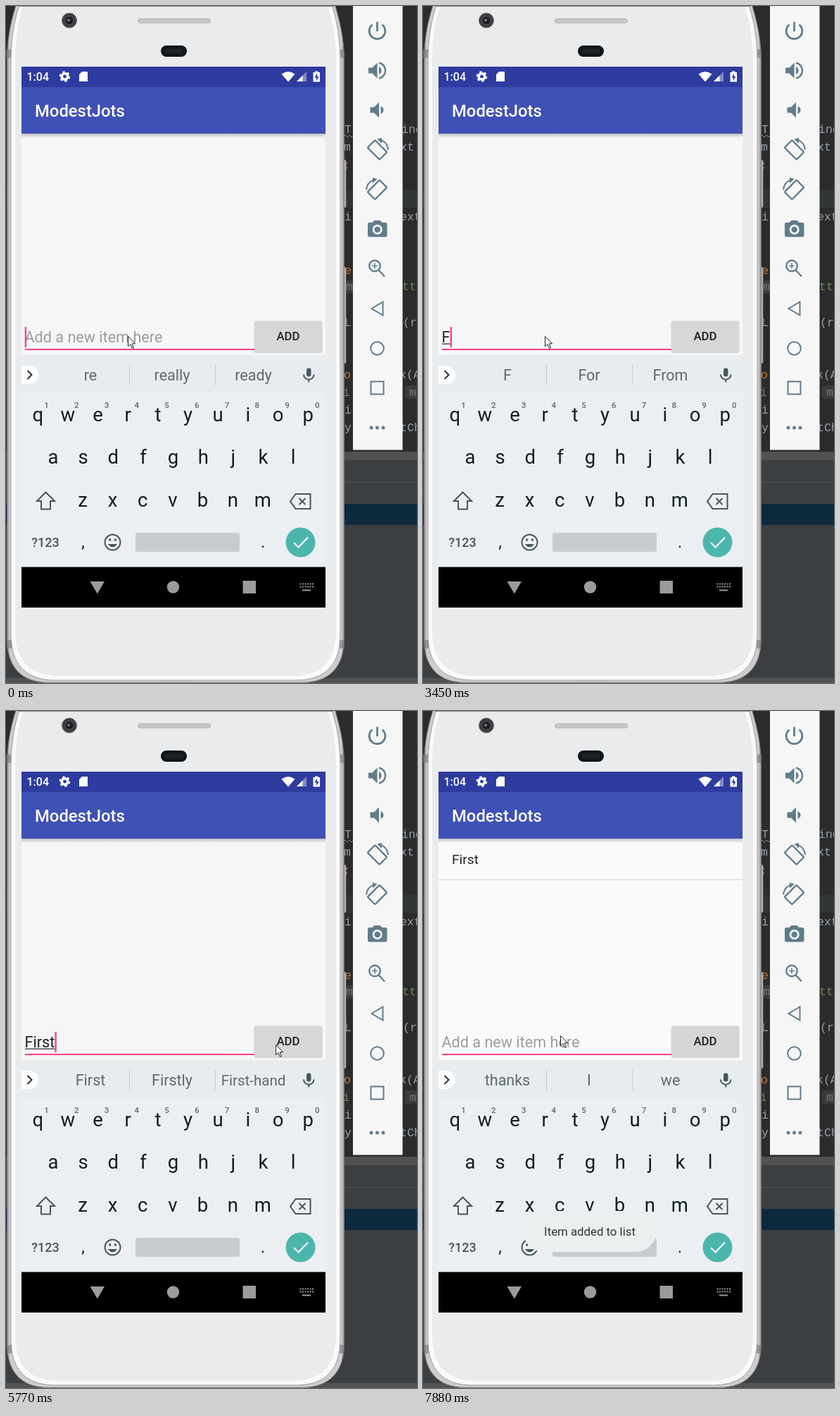
These frames come from a looping animation (584x960 px, 8 s). An HTML page:

```html
<!DOCTYPE html>
<html lang="en">
<head>
<meta charset="utf-8">
<title>Todo demo</title>
<style>
  html, body { margin: 0; width: 100%; height: 100%; overflow: hidden; background: #2b2b2b; }
  svg { display: block; width: 100%; height: 100%; }
  text { font-family: Roboto, sans-serif; white-space: pre; }
  .mid { text-anchor: middle; }
  .code text { font: 16.500px "Liberation Mono", monospace; fill: #94a0ad; }
  .key { font-size: 27.5px; fill: #101e25; }
  .digit { font-size: 11.5px; font-weight: 500; fill: #5a686f; }
  .sug { font-size: 21.5px; fill: #5c696f; }
  .line { fill: none; stroke-width: 2; }
  .tool { fill: #607d8b; stroke: #607d8b; }
  .tool .line { stroke-width: 2.4; fill: none; }
</style>
</head>
<body>
<svg viewBox="0 0 584 960">
  <defs>
    <linearGradient id="metal">
      <stop offset="0" stop-color="#8f8c8e"/><stop offset=".008" stop-color="#cfccce"/>
      <stop offset=".5" stop-color="#cac8ca"/><stop offset=".992" stop-color="#cfccce"/>
      <stop offset="1" stop-color="#8f8c8e"/>
    </linearGradient>
    <linearGradient id="drop" x2="0" y2="1">
      <stop offset="0" stop-color="#000" stop-opacity=".22"/><stop offset="1" stop-color="#000" stop-opacity="0"/>
    </linearGradient>
    <clipPath id="screen"><rect x="22" y="86" width="432" height="767"/></clipPath>
  </defs>

  <!-- editor behind -->
  <rect width="584" height="960" fill="#2b2b2b"/>
  <rect y="261" width="584" height="25" fill="#323535"/>
  <rect y="632" width="584" height="328" fill="#3c3f41"/>
  <rect y="632" width="584" height="12" fill="#515151"/>
  <rect y="675" width="584" height="1" fill="#525557"/>
  <rect y="706" width="584" height="30" fill="#0d293e"/>
  <rect y="953" width="584" height="7" fill="#515456"/>
  <rect x="470" y="389" width="26" height="19" rx="3" fill="#3b3b3b"/>
  <rect x="567" y="538" width="30" height="19" rx="3" fill="#3b3b3b"/>
  <g class="code" id="code"></g>
  <path d="M480 185l2-2 3 3 3-3 3 3 2-2" fill="none" stroke="#8c8c8c"/>

  <!-- phone body -->
  <rect x="478" y="218" width="5" height="68" rx="2" fill="#c9c7c9" stroke="#777"/>
  <rect x="478" y="370" width="5" height="137" rx="2" fill="#c9c7c9" stroke="#777"/>
  <path d="M17-10C7 20 1.500 45 1.500 78V897C1.500 937 21 959 60 959.500H421C460 959 480.500 937 480.500 897V78C480.500 45 474 20 465-10Z" fill="url(#metal)" stroke="#777477"/>
  <path d="M22-10C11 20 7 48 7 80V890C7 933 27 955 68 956H414C455 955 475 933 475 890V80C475 48 471 20 460-10Z" fill="#fafafa" stroke="#a09da0"/>
  <path d="M28-10C16 22 13 48 13 82V884C13 927 32 949 73 950H409C450 949 469 927 469 884V82C469 48 465 22 454-10Z" fill="#e9ebed"/>
  <path d="M0 67.500H7M475 67.500H481M1 905H8M474 905H480.500" stroke="#77757a" stroke-width="12" opacity=".6"/>
  <path d="M17 .5H465" stroke="#8b8b8e"/>
  <circle cx="90" cy="20.500" r="10.500" fill="#3d3d40" stroke="#6d6d70"/>
  <circle cx="90" cy="20.500" r="6" fill="#1d1d21" stroke="#59595d"/>
  <circle cx="89" cy="20" r="2" fill="#777a82"/>
  <rect x="187.500" y="18" width="103" height="6" rx="3" fill="#c6c7c9" stroke="#b0b1b3"/>
  <rect x="220" y="56" width="37" height="16" rx="8" fill="#11161a"/>
  <path d="M229 64H248" stroke="#1b2329" stroke-width="7" stroke-linecap="round"/>

  <g clip-path="url(#screen)">
    <!-- app -->
    <rect id="page" x="22" y="181" width="432" height="314"/>
    <rect x="22" y="181" width="432" height="6" fill="url(#drop)"/>
    <rect x="22" y="86" width="432" height="29" fill="#2d3c9e"/>
    <rect x="22" y="115" width="432" height="66" fill="#3f51b5"/>
    <text x="29.500" y="106" font-size="16" font-weight="500" fill="#fff">1:04</text>
    <g fill="#fff">
      <circle cx="83.500" cy="100" r="4.300" fill="none" stroke="#fff" stroke-width="3.600"/>
      <circle cx="83.500" cy="100" r="6.600" fill="none" stroke="#fff" stroke-width="2.200" stroke-dasharray="3.450"/>
      <path d="M108 93H116V107H104V97Z"/>
      <path d="M391.500 96.500Q401 89.500 410.500 96.500L401 107.500Z"/>
      <path d="M427 93V107H413Z" opacity=".4"/><path d="M421.500 98.500V107H413Z"/>
      <path d="M439 92.500H443.500V94H446V107.500H436.500V94H439Z"/>
    </g>
    <path d="M442 95.500L438.500 101.500H441V106L444.500 100H442Z" fill="#2d3c9e"/>
    <text x="41" y="156.500" font-size="23.800" font-weight="500" fill="#fff">ModestJots</text>

    <g id="item">
      <text x="41" y="217" font-size="19.200" fill="#212121">First</text>
      <rect x="22" y="238.500" width="432" height="1.500" fill="#dedede"/>
    </g>

    <rect x="27" y="486" width="326" height="2" fill="#fb4480"/>
    <text id="hint" x="26.500" y="477" font-size="21.600" fill="#9c9c9c">Add a new item here</text>
    <text id="typed" x="26.500" y="477" font-size="21.600" fill="#212121"></text>
    <rect id="under" x="27" y="478.500" height="1.300" fill="#333"/>
    <rect id="caret" y="455" width="2.400" height="29" fill="#f2487f"/>
    <rect x="352.500" y="447" width="97" height="45" rx="3" fill="#000" opacity=".14"/>
    <rect id="btn" x="353" y="446.500" width="96" height="43.500" rx="2"/>
    <text class="mid" x="401" y="474" font-size="16.800" font-weight="500" fill="#212121">ADD</text>

    <!-- keyboard -->
    <rect x="22" y="495" width="432" height="301" fill="#eceff1"/>
    <rect x="22" y="495" width="432" height="54" fill="#e8ecef"/>
    <path d="M22 510H33A13 13 0 0 1 33 536H22Z" fill="#fff"/>
    <path d="M30.500 517L36.500 523L30.500 529" class="line" stroke="#263238" stroke-width="2.400"/>
    <path d="M175.500 509V538M297.500 509V538" stroke="#c5ccd0"/>
    <rect x="427" y="513.500" width="6.500" height="12" rx="3.200" fill="#46565e"/>
    <path d="M423 522.500A7.200 7.200 0 0 0 437.500 522.500M430.200 529.500V533.500" class="line" stroke="#46565e"/>
    <g id="sugs"></g>
    <g id="keys"></g>
    <text class="mid" x="56" y="767" font-size="18" font-weight="500" fill="#46565e">?123</text>
    <g class="line" stroke="#46565e">
      <path d="M56.500 689.500L69 702H63V713.500H50V702H44Z"/>
      <path d="M411.500 692H432.500V713H411.500L404 702.500ZM416.500 698L425.500 707M425.500 698L416.500 707"/>
      <circle cx="151.500" cy="760.500" r="11"/>
      <path d="M146 763.500Q151.500 770 157 763.500Z" stroke-width="1.200" fill="#46565e"/>
    </g>
    <circle cx="147.700" cy="757" r="1.700" fill="#46565e"/><circle cx="155.300" cy="757" r="1.700" fill="#46565e"/>
    <rect x="184" y="747" width="148" height="27" rx="3" fill="#c7ccd0"/>
    <circle cx="418.500" cy="760.500" r="21" fill="#4db6ac"/>
    <path d="M409 761L415.500 767.500L429 753.500" class="line" stroke="#fff" stroke-width="2.400"/>

    <rect x="22" y="795.500" width="432" height="58" fill="#000"/>
    <g fill="#9b9b9b">
      <path d="M119.500 816H140L129.800 833.500Z"/>
      <circle cx="237.500" cy="824" r="8.700"/>
      <rect x="336.500" y="815" width="18.500" height="18"/>
      <path d="M417.500 819.500H437M417.500 823.500H437" stroke="#9b9b9b" stroke-width="2" stroke-dasharray="2 1.500"/>
      <path d="M421 828.500H433" stroke="#9b9b9b" stroke-width="2"/>
    </g>

    <g id="toast">
      <rect x="142.500" y="709" width="189" height="58" rx="29" fill="#eceff0"/>
      <text class="mid" x="237" y="743.500" font-size="16.800" fill="#303436">Item added to list</text>
    </g>
  </g>

  <!-- side tools -->
  <rect x="493" width="70.500" height="629.500" fill="#f6f6f6"/>
  <g class="tool" stroke-width="0">
    <path class="line" d="M527.500 22.500V36M520.500 26.500A11.300 11.300 0 1 0 534.500 26.500" style="stroke-width:2.800"/>
    <path d="M515 87.500H520.500L527.500 80.500V102.500L520.500 95.500H515ZM530 86Q533.500 88 533.500 91.500T530 97Z"/>
    <path class="line" d="M530 80.500A11.200 11.200 0 0 1 530 102.500"/>
    <path d="M517.500 143.500H523L530 136.500V158.500L523 151.500H517.500ZM532.500 142Q536.500 144 536.500 147.500T532.500 153Z"/>
    <g id="rot">
      <rect class="line" x="-7.500" y="-12" width="15" height="24" rx="1.500" transform="translate(527.500 204) rotate(-45)"/>
      <path class="line" d="M529 189.500Q541.500 191 543 204" style="stroke-width:2"/>
      <path d="M527.500 188.500L534 187V195Z"/>
    </g>
    <use href="#rot" transform="translate(1055 56.500) scale(-1 1)"/>
    <path fill-rule="evenodd" d="M523.500 304H531.500L534.500 307H539Q541.500 307 541.500 309.500V325Q541.500 327.500 539 327.500H516.500Q514 327.500 514 325V309.500Q514 307 516.500 307H520.500ZM527.700 310A7 7 0 1 0 527.700 324A7 7 0 1 0 527.700 310Z"/>
    <circle cx="527.700" cy="317" r="4.300"/>
    <circle class="line" cx="524" cy="368.500" r="7.800"/>
    <path class="line" d="M529.500 374.500L538 383.500"/>
    <path class="line" d="M520 368.500H528M524 364.500V372.500" style="stroke-width:1.600"/>
    <path class="line" d="M519.500 429L535.500 419.500V438.500Z" style="stroke-width:2"/>
    <circle class="line" cx="527.500" cy="485.500" r="9.300" style="stroke-width:2"/>
    <rect class="line" x="518.500" y="532.500" width="18" height="18" style="stroke-width:2"/>
    <circle cx="519" cy="598" r="2.500"/><circle cx="527.500" cy="598" r="2.500"/><circle cx="536" cy="598" r="2.500"/>
  </g>

  <path id="mouse" d="M.5 .5V14.500L3.800 11.600L6.200 17H8.300L6.200 10.800H10.600Z" fill="#fff" stroke="#222"/>
</svg>

<script>
const $ = id => document.getElementById(id);
const label = (s, x, y, cls, style = '') =>
  `<text class="${cls}" x="${x}" y="${y}" style="${style}">${s}</text>`;

const orange = '#cc7832', green = '#6a8759', grey = '#787878';
$('code').innerHTML = [
  ['T', 481, 180], ['m', 480, 205], [';', 479, 231, orange], ['i', 481, 304],
  ['e', 481, 380, orange], ['m', 483, 403, grey], ['L', 481, 454], ['o', 480, 528, orange],
  ['i', 479, 553, green], ['i', 481, 578], ['y', 481, 603],
  ['inc', 562, 180], ['xt', 560, 205], ['ext', 560, 304], ['tt', 563, 403, green],
  ['(r', 564, 454], ['k(A', 559, 528], ['m', 573, 553, grey], ['tCh', 560, 603]
].map(([s, x, y, c]) => label(s, x, y, '', c ? 'fill:' + c : '')).join('');

const row = (chars, x0, y) => [...chars].map((c, i) =>
  label(c, x0 + i * 42.65, y, 'mid key')).join('');
$('keys').innerHTML = row('qwertyuiop', 45.3, 589) + row('asdfghjkl', 67, 649) +
  row('zxcvbnm', 109, 710) +
  [[',', 109.5], ['.', 365]].map(([c, x]) => label(c, x, 768, 'mid key', 'font-size:23px')).join('') +
  [...'1234567890'].map((c, i) => label(c, 57.5 + i * 42.75, 570, 'mid digit')).join('');
$('sugs').innerHTML = [120, 236, 351.5].map(x => label('', x, 531, 'mid sug')).join('');

// each step changes part of the state
const steps = [
  [0, { text: '', caret: 1, sug: 're really ready', x: 173, y: 468, btn: '#d6d7d7', added: 0, toast: 0 }],
  [120, { caret: 0 }], [560, { caret: 1 }], [1120, { caret: 0 }],
  [1550, { caret: 1 }], [2130, { caret: 0 }], [2570, { caret: 1 }],
  [3150, { caret: 0 }],
  [3300, { text: 'F', caret: 1 }],
  [3450, { sug: 'F For From' }],
  [3880, { text: 'Fi', sug: 'Fi First Fine' }],
  [4160, { text: 'Fir' }],
  [4310, { text: 'Firs' }],
  [4460, { text: 'First' }],
  [4610, { sug: 'First Firstly First-hand' }],
  [5050, { caret: 0 }], [5480, { caret: 1 }],
  [5620, { x: 312, y: 472 }],
  [5770, { x: 383, y: 473 }],
  [6160, { caret: 0, btn: '#c4c6c6' }],
  [6310, { text: '', caret: 1, added: 1, btn: '#bcbebe', x: 269.5, y: 470.5 }],
  [6450, { btn: '#cacccc', x: 211, y: 463 }],
  [6590, { btn: '#d4d6d6', x: 195, y: 460 }],
  [6870, { caret: 0, toast: 0.45 }],
  [7020, { toast: 0.78 }],
  [7170, { toast: 0.95 }],
  [7320, { caret: 1, toast: 1 }],
  [7880, { caret: 0, sug: 'thanks I we' }]
];

function draw(now) {
  const t = now % 8000;
  const s = Object.assign({}, ...steps.filter(([at]) => at <= t).map(([, part]) => part));
  $('typed').textContent = s.text;
  const w = s.text ? $('typed').getComputedTextLength() : 0;
  $('under').setAttribute('width', w);
  $('caret').setAttribute('x', 26.7 + w);
  $('caret').style.opacity = s.caret;
  $('hint').style.opacity = s.text ? 0 : 1;
  $('item').style.opacity = s.added;
  $('page').style.fill = s.added ? '#fafafa' : '#f6f6f6';
  $('btn').style.fill = s.btn;
  $('toast').style.opacity = s.toast;
  $('mouse').setAttribute('transform', `translate(${s.x} ${s.y})`);
  s.sug.split(' ').forEach((word, i) => {
    const el = $('sugs').children[i];
    el.textContent = word;
    el.style.fontSize = word.length > 9 ? '20.5px' : '';
  });
}

const start = performance.now();
function tick() {
  draw(performance.now() - start);
  requestAnimationFrame(tick);
}
tick();
</script>
</body>
</html>
```
